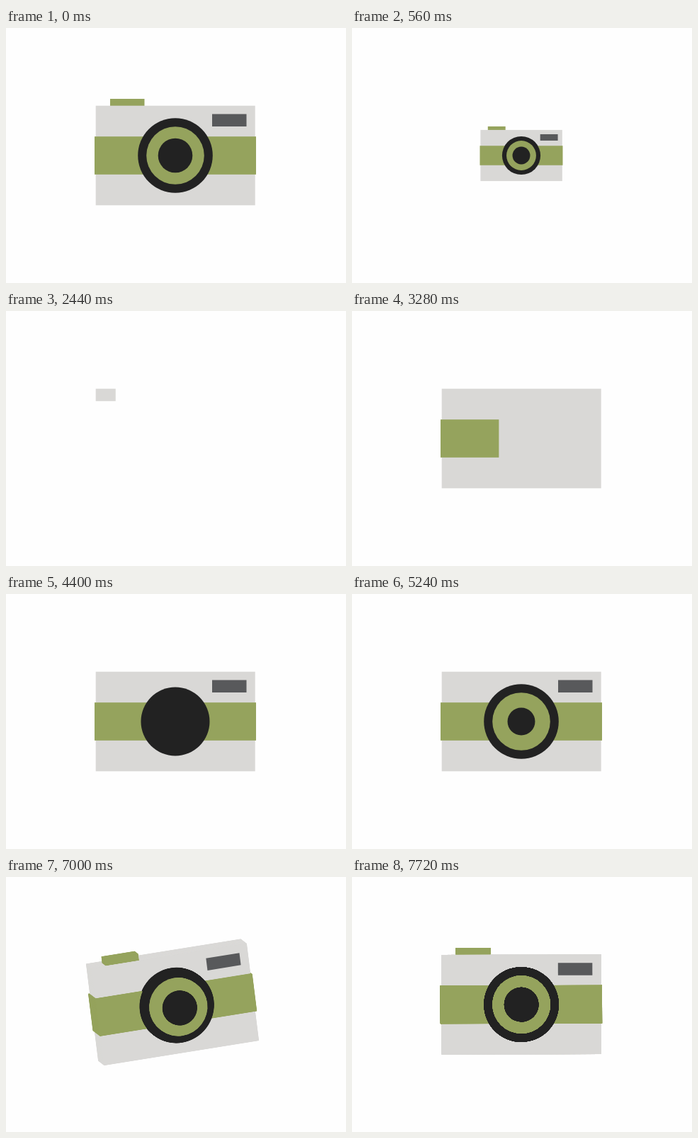
These frames come from a looping animation (480 px wide and 360 px high, 7.76 s). An HTML page with a canvas:

```html
<!DOCTYPE html>
<html lang="en">
<head>
<meta charset="utf-8">
<title>Camera</title>
<style>
html, body { margin: 0; width: 480px; height: 360px; overflow: hidden; background: #fefefe; }
canvas { display: block; }
</style>
</head>
<body>
<canvas id="stage" width="480" height="360"></canvas>
<script>
const ctx = document.getElementById('stage').getContext('2d');
const LOOP = 7760, CX = 239, CY = 180, RAD = Math.PI / 180;
const GREEN = '#95a35d', BLACK = '#222222', BODY = '#d9d8d6', WINDOW = '#58595b';

const clamp = u => Math.min(1, Math.max(0, u));
const span = (t, from, to) => clamp((t - from) / (to - from));
const mix = (a, b, u) => a + (b - a) * u;
const smooth = u => u * u * (3 - 2 * u);
const easeOut = u => 1 - (1 - u) ** 2;
const overshoot = u => u <= 0 ? 0 : 1 + 2 * (u - 1) ** 3 + (u - 1) ** 2;

function bezier(x1, y1, x2, y2) {
  const at = (a, b, s) => 3 * a * s * (1 - s) ** 2 + 3 * b * s * s * (1 - s) + s ** 3;
  return x => {
    let lo = 0, hi = 1;
    for (let i = 0; i < 24; i++) {
      const mid = (lo + hi) / 2;
      if (at(x1, x2, mid) < x) lo = mid; else hi = mid;
    }
    return at(y1, y2, lo);
  };
}
const swingEase = bezier(0.25, 0, 0.2, 1);

function rect(color, x, y, w, h) {
  ctx.fillStyle = color;
  ctx.fillRect(x, y, w, h);
}

function disc(color, x, y, r) {
  ctx.fillStyle = color;
  ctx.beginPath();
  ctx.arc(x, y, Math.max(0, r), 0, 2 * Math.PI);
  ctx.fill();
}

// Camera parts around the lens centre; back and front are depths.
function cameraParts(t) {
  const whole = t < 2000;
  const grow = (from, to, ease) => whole ? 1 : ease(span(t, from, to));
  const body = grow(2408, 2920, easeOut);
  const stripe = grow(3090, 3560, smooth);
  const win = grow(3620, 3930, smooth);
  const lens = grow(4190, 4730, overshoot);
  const ring = grow(4640, 5180, overshoot);
  const pupil = grow(5080, 5620, overshoot);
  const rise = grow(5640, 5860, smooth);
  const press = 4 * Math.sin(Math.PI * span(t, 6080, 6320));
  const parts = [
    [rise, -26, -2, () => rect(GREEN, -92, -80 + 10 * (1 - rise) + press, 48.5, 10)],
    [body, -41, 0, () => rect(BODY, -112.3, -70.3, 225 * body, 140.6 * body)],
    [win, 0, 0, () => rect(WINDOW, 52, -58.5, 48.5 * win, 17.5)],
    [stripe, -44, 6, () => rect(GREEN, -114, -26.8, 228 * stripe, 53.6)],
    [lens, 0, 15, () => disc(BLACK, 0, 0, 52.8 * lens)],
    [ring, 15, 27, () => disc(GREEN, 0, 0, 40.8 * ring)],
    [pupil, 27, 35, () => disc(BLACK, 0, 0, 24.3 * pupil)]
  ];
  return parts.filter(p => p[0] > 0);
}

function drawCamera(t) {
  const parts = cameraParts(t);
  const x = span(t, 6902, 7738);
  const tilt = 2.9 * swingEase(1 - Math.abs(2 * x - 1));

  if (tilt < 0.005) {
    const shrink = t < 2000 ? 1 - smooth(span(t, 60, 1080)) : 1;
    if (shrink <= 0) return;
    ctx.save();
    ctx.translate(CX, CY);
    ctx.scale(shrink, shrink);
    parts.forEach(p => p[3]());
    ctx.restore();
    return;
  }

  const [a, b, c] = [-8.6, 11, -6.7].map(v => v * tilt * RAD);
  const [sa, ca, sb, cb, sc, cc] = [a, b, c].flatMap(v => [Math.sin(v), Math.cos(v)]);
  ctx.save();
  for (let z = -44; z <= 35; z++) {
    ctx.setTransform(
      cc * cb, sc * ca + cc * sb * sa,
      -sc * cb, cc * ca - sc * sb * sa,
      CX + sb * z, CY - cb * sa * z);
    for (const [, back, front, draw] of parts) if (z >= back && z <= front) draw();
  }
  ctx.restore();
}

function drawFlash(t) {
  const f = smooth(span(t, 6040, 6200)) * (1 - smooth(span(t, 6230, 6540)));
  if (f <= 0) return;
  ctx.save();
  ctx.beginPath();
  ctx.rect(121, 100, 236, 152);
  ctx.clip();
  rect(`rgba(255,255,255,${0.21 * f})`, 121, 100, 236, 152);
  ctx.translate(315.5, 129.5);

  const halo = ctx.createRadialGradient(0, 0, 0, 0, 0, 85);
  halo.addColorStop(0, `rgba(255,255,255,${0.55 * f})`);
  halo.addColorStop(0.4, `rgba(255,255,255,${0.22 * f})`);
  halo.addColorStop(1, 'rgba(255,255,255,0)');
  disc(halo, 0, 0, 85);

  for (let i = 0; i < 22; i++) {
    const angle = i * 2 * Math.PI / 22 + 0.12 * Math.sin(i * 5);
    const len = (38 + 36 * Math.abs(Math.sin(i * 2.3 + 1))) * (0.5 + 0.5 * f);
    const ray = ctx.createLinearGradient(0, 0, len, 0);
    ray.addColorStop(0, `rgba(255,255,255,${0.8 * f})`);
    ray.addColorStop(0.3, `rgba(238,248,255,${0.45 * f})`);
    ray.addColorStop(1, 'rgba(255,255,255,0)');
    ctx.save();
    ctx.rotate(angle);
    ctx.fillStyle = ray;
    ctx.beginPath();
    ctx.moveTo(0, -1);
    ctx.lineTo(len, -1.5);
    ctx.lineTo(len, 1.5);
    ctx.lineTo(0, 1);
    ctx.fill();
    ctx.restore();
  }

  const core = ctx.createRadialGradient(0, 0, 0, 0, 0, 23);
  core.addColorStop(0, `rgba(255,255,255,${f})`);
  core.addColorStop(0.27, `rgba(255,255,255,${0.95 * f})`);
  core.addColorStop(0.48, `rgba(168,222,250,${0.6 * f})`);
  core.addColorStop(1, 'rgba(190,230,250,0)');
  disc(core, 0, 0, 23);
  ctx.restore();
}

// Each photo: start time, resting place, resting angle.
const photos = [
  [960, 267, 147, 16],
  [1140, 206, 175, -14],
  [1330, 243, 204, 6]
];

function drawPhoto(t, [start, x, y, angle], i) {
  const into = smooth(span(t, start, start + 240));
  const leave = span(t, 1660 + i * 60, 2030 + i * 60);
  const size = into * (1 - smooth(leave));
  if (size <= 0.01) return;
  const lift = 10 * Math.sin(Math.PI * leave);
  const drift = smooth(leave);
  ctx.save();
  ctx.globalAlpha = clamp(size * 1.4);
  ctx.translate(mix(mix(237, x, into), 237, drift), mix(mix(174, y, into), 174, drift) - lift);
  ctx.rotate(angle * RAD + (1 - into) * 0.3);
  ctx.scale(size, size);
  ctx.beginPath();
  ctx.roundRect(-14.5, -17.7, 29, 35.4, 3.5);
  ctx.fillStyle = '#fefefe';
  ctx.fill();
  ctx.strokeStyle = '#505052';
  ctx.lineWidth = 2.3;
  ctx.stroke();
  rect('#a2a2a2', -10, -13, 20, 22);
  disc('#fefefe', -4, -5.5, 2.2);
  disc('#fefefe', 4, -5.5, 2.2);
  ctx.beginPath();
  ctx.arc(0, -0.5, 6.2, 0, Math.PI);
  ctx.fill();
  ctx.restore();
}

function draw(t) {
  rect('#fefefe', 0, 0, 480, 360);
  drawCamera(t);
  drawFlash(t);
  if (t > 900 && t < 2170) photos.forEach((p, i) => drawPhoto(t, p, i));
}

const begin = performance.now();
function tick() {
  draw((performance.now() - begin) % LOOP);
  requestAnimationFrame(tick);
}
tick();
</script>
</body>
</html>
```
